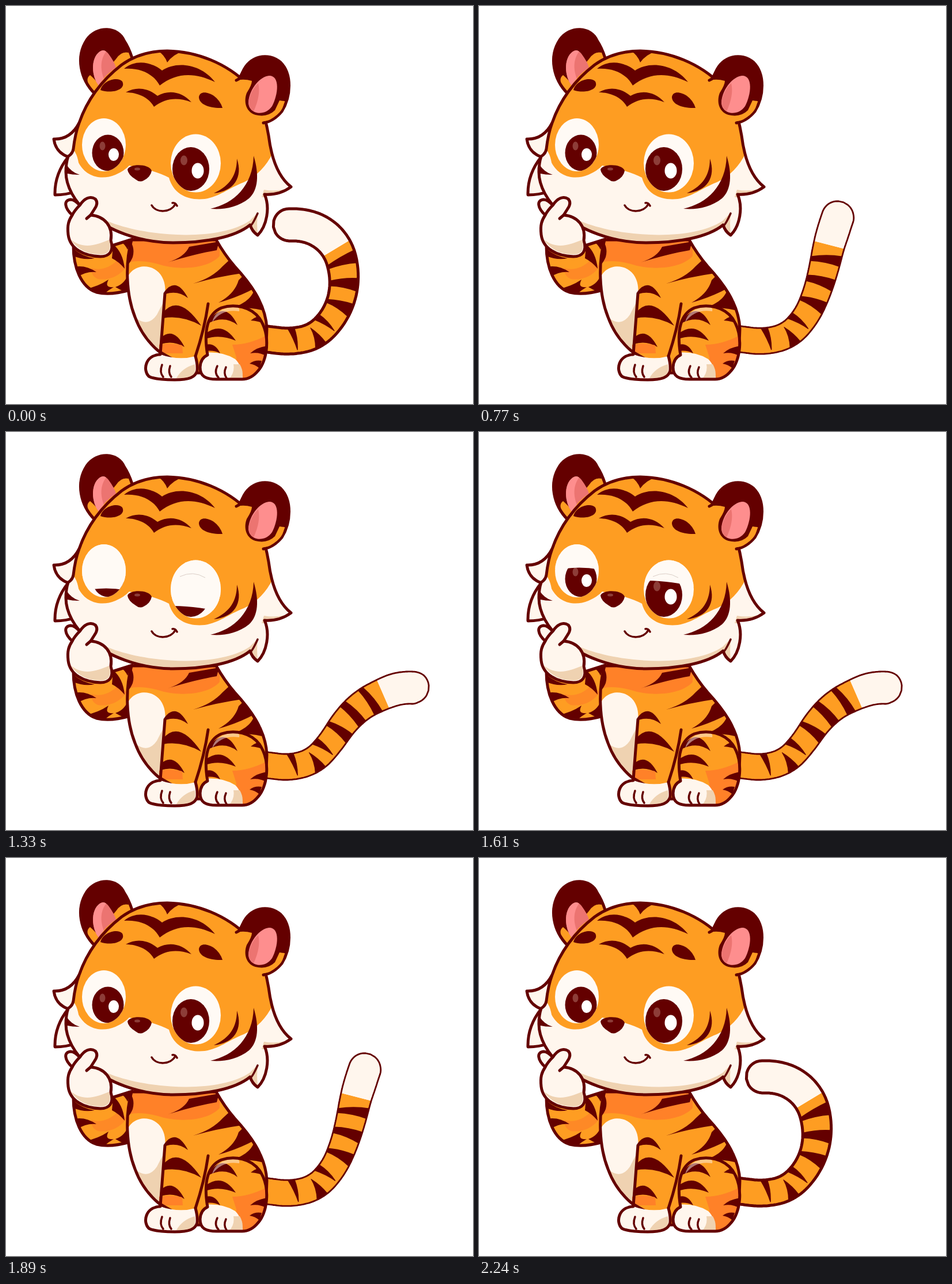
An HTML page for the animation above (2.73 s loop, 811 by 691 pixels).

```html
<!DOCTYPE html>
<html lang="en">
<head>
<meta charset="utf-8">
<title>Tiger</title>
<style>
  html, body { margin: 0; width: 100%; height: 100%; overflow: hidden; background: #fff; }
  svg { display: block; width: 100%; height: 100%; }
  .line { stroke: #640000; stroke-width: 5; stroke-linejoin: round; stroke-linecap: round; }
  .thin { stroke-width: 3.5; }
  .dark { fill: #640000; }
  .orange { fill: #fe9d22; }
  .deep { fill: #ff8128; }
  .cream { fill: #fff6ed; }
  .sclera { fill: #fffaf5; }
  .tan { fill: #efd2b1; }
  .pink { fill: #fe8e8e; }
  .rose { fill: #ec7471; }
  .glint { fill: #8d3d38; }
  .none { fill: none; }
</style>
</head>
<body>
<svg viewBox="0 0 811 691">
  <defs>
    <clipPath id="headClip"><path id="headShape" d="M127 203C140 165 165 130 201 102C225 85 252 78 280 78C332 79 382 99 420 136C440 157 450 190 456 225C461 265 473 297 495 314C480 325 464 328 449 327C459 350 453 382 437 398Q427 391 424 380C397 402 345 411 290 411C232 411 176 389 143 360C119 340 104 313 104 288Q104 273 108 261Q116 256 117 248Q120 222 127 203Z"/></clipPath>
    <clipPath id="eyeL"><ellipse cx="170" cy="241" rx="38" ry="46"/></clipPath>
    <clipPath id="eyeR"><ellipse cx="329.500" cy="273" rx="43.500" ry="50.500"/></clipPath>
    <clipPath id="bodyClip"><path id="bodyShape" d="M218 406C207 445 208 500 224 540Q237 576 266 600L330 637L425 637C444 620 453 593 453 560C451 515 421 478 397 452Q379 431 365 406Z"/></clipPath>
    <clipPath id="armClip"><path id="armShape" d="M117 417C117 453 130 488 157 497Q181 503 215 493L219 405L181 417Z"/></clipPath>
    <clipPath id="hindClip"><path id="hindShape" d="M350 606C343 564 349 535 374 524C398 516 426 523 440 542C461 572 453 617 438 633Q426 648 410 648H370C345 649 337 642 337 627Q338 611 350 606Z"/></clipPath>
  </defs>

  <!-- tail -->
  <g id="tail">
    <path id="fur" class="orange"/>
    <path id="tip" class="cream"/>
    <path id="bands" class="dark"/>
    <path id="edge" class="line none"/>
  </g>

  <!-- raised arm -->
  <use href="#armShape" class="orange"/>
  <g clip-path="url(#armClip)">
    <path class="deep" d="M148 455Q172 462 194 441L210 452Q190 478 160 474Q148 470 148 455Z" opacity=".7"/>
    <path class="dark" d="M114 418Q130 435 154 438Q136 442 117 434ZM118 453Q138 449 157 462Q140 460 123 471ZM139 491Q160 487 178 475Q170 490 187 488Q175 495 166 504ZM186 414Q203 427 206 456Q196 444 184 438ZM211 423Q207 414 199 409L218 404ZM190 488Q207 482 212 465V500Z"/>
  </g>
  <use href="#armShape" class="line none"/>

  <!-- body -->
  <use href="#bodyShape" class="orange"/>
  <g clip-path="url(#bodyClip)">
    <path class="deep" d="M210 400H371V434C352 456 300 460 264 448Q234 440 212 445Z"/>
    <path class="cream" d="M210 475C216 452 244 446 261 459C275 469 278 487 276 503L268 605C235 580 213 530 210 475Z"/>
    <path class="tan" d="M226 542Q247 558 262 536Q268 524 273 515L267 602Q239 580 226 542Z"/>
    <path class="dark" d="M217 410Q224 422 220 436Q216 446 209 452ZM281 445Q310 436 318 418L370 409L366 424Q330 430 281 445ZM325 482Q358 472 376 452L389 440L410 464Q367 470 325 482ZM369 515Q397 500 404 476L412 468L432 490Q402 506 369 515ZM390 524Q420 517 430 496L447 516L444 528Q422 523 390 524Z"/>
    <path class="dark" d="M275 496Q296 469 316 507Q298 493 277 500ZM272 533Q300 498 339 555Q305 536 273 542ZM269 576Q291 556 310 592Q290 580 269 587Z"/>
    <path class="deep" d="M266 588Q285 584 306 589L307 603H266Z"/>
  </g>
  <use href="#bodyShape" class="line none"/>

  <!-- hind leg -->
  <use href="#hindShape" class="orange"/>
  <g clip-path="url(#hindClip)">
    <path class="deep" d="M393 588Q425 588 460 568V655H400V610Z"/>
    <path class="cream" d="M330 604Q372 596 398 613Q412 626 411 655H330Z"/>
    <path class="tan" d="M385 650Q398 638 395 622L406 622Q414 636 409 650Z"/>
    <path class="dark" d="M355 543Q382 512 402 554Q380 537 353 550ZM346 569Q376 546 399 581Q371 569 346 578ZM344 589Q362 582 372 603Q358 596 344 600ZM456 536Q437 536 425 546Q441 547 456 555ZM456 590Q436 592 424 603Q440 600 452 608ZM444 616Q432 614 423 621Q432 622 440 629Z"/>
    <path class="cream" opacity=".5" d="M358 549Q363 525 399 521Q407 524 405 530Q375 525 358 549Z"/>
  </g>
  <use href="#hindShape" class="line none"/>
  <path class="line thin none" d="M367 625Q361 637 369 645M382 627Q377 638 383 646"/>

  <!-- front leg -->
  <path class="line none" d="M276 499L268 604M351 517Q345 560 329 608"/>
  <path id="paw" class="cream" d="M268 605C242 606 237 632 248 643Q258 649 293 649C318 649 329 645 332 633Q333 622 329 608Q300 616 268 605Z"/>
  <path class="tan" d="M296 646Q306 628 328 622Q332 645 314 646Z"/>
  <path class="line none" d="M268 605C242 606 237 632 248 643Q258 649 293 649C318 649 329 645 332 633Q333 622 329 608"/>
  <path class="line thin none" d="M271 623Q266 636 273 644M285 625Q281 637 287 644"/>

  <!-- left ear -->
  <path class="orange line" d="M154 152C129 127 121 88 140 59C158 33 195 36 205 60Q213 72 219 90L187 133Z"/>
  <path class="dark" d="M144 137C125 108 126 74 143 55C163 33 196 38 207 64L213 81Q200 78 191 92L158 132Q151 124 146 120Q138 126 144 137Z"/>
  <path class="rose" d="M161 138C149 123 146 91 163 79Q171 74 178 83Q189 98 191 107Q172 119 161 138Z"/>
  <path class="pink" d="M161 138C149 123 146 91 163 79Q169 75 174 79C162 94 165 114 170 126Q165 131 161 138Z"/>

  <!-- cheek tufts and head -->
  <path class="cream line" d="M127 203Q112 232 83 231Q86 254 108 262Q84 292 85 328Q105 328 121 322L145 240Z"/>
  <use href="#headShape" class="cream"/>
  <g clip-path="url(#headClip)">
    <path class="tan" d="M150 360C208 399 362 414 423 373L438 358Q434 375 438 402L425 387L410 415H190ZM448 319Q475 324 498 313L462 332H444Z"/>
    <path class="orange" d="M110 245Q122 249 126 272C139 297 166 303 190 293Q206 286 214 277L249 285Q270 291 283 298C291 327 316 338 345 335C371 331 385 317 413 306Q449 289 466 249L455 70H100Z"/>
    <path class="dark" d="M262 77Q275 84 280 98Q290 84 307 79L280 72Z"/>
    <path class="dark" d="M205 109C226 91 254 98 271 112C295 96 337 99 363 132C328 115 296 115 267 138C254 115 230 107 205 109ZM208 150C228 138 249 144 263 156C284 144 307 150 322 167C297 158 277 160 257 175C248 159 229 150 208 150Z"/>
    <path class="dark" d="M401 265C412 297 396 322 361 325C382 315 401 300 401 265ZM430 260C440 292 438 320 422 334C402 350 377 354 355 352C396 343 429 312 430 260Z"/>
    <path class="dark" d="M102 270Q111 288 128 293Q114 293 102 290Z"/>
  </g>
  <use href="#headShape" class="line none"/>
  <path class="line thin none" d="M437 360Q428 380 424 382"/>

  <!-- right ear -->
  <path class="orange" d="M397 128Q407 127 410 115C421 87 455 78 478 99C497 119 495 158 478 184Q464 200 447 203L424 178L415 150Z"/>
  <path class="dark" d="M402 129C410 107 424 88 447 86C476 85 494 111 492 144L489 166L475 164L467 181Q454 194 433 189C415 183 413 164 418 151Q427 137 427 130Q413 126 402 129Z"/>
  <path class="line none" d="M400 129Q408 126 411 115C422 87 455 79 477 98C497 118 495 157 479 183Q465 200 447 203"/>
  <path class="orange" d="M466 184Q478 175 482 164Q485 182 459 197Q448 202 445 198Q457 195 466 184Z"/>
  <path class="pink" d="M421 166C423 143 442 122 457 121C476 121 473 153 462 174C449 193 420 188 421 166Z"/>
  <path class="rose" d="M421 166Q425 146 438 134Q443 154 430 183Q422 179 421 166Z"/>

  <!-- face -->
  <path class="dark" d="M164 146C168 129 194 122 202 131C209 145 185 153 164 146ZM335 158C337 146 352 150 361 156Q372 164 376 177C354 178 335 171 335 158Z"/>
  <g clip-path="url(#eyeL)">
    <rect class="sclera" x="130" y="190" width="80" height="105"/>
    <ellipse class="dark" cx="177" cy="255" rx="27.500" ry="31.500"/>
    <ellipse class="glint" cx="167.500" cy="243" rx="5" ry="7.500"/>
    <ellipse cx="187" cy="258" rx="9" ry="11" fill="#fff"/>
    <path id="lidL" class="sclera" d="M130 135H210V239Q180 233 150 237L130 238Z"/>
  </g>
  <g clip-path="url(#eyeR)">
    <rect class="sclera" x="280" y="220" width="100" height="110"/>
    <ellipse class="dark" cx="321" cy="283" rx="32" ry="38"/>
    <ellipse class="glint" cx="309" cy="268" rx="6" ry="8.500"/>
    <ellipse cx="333" cy="286" rx="10.500" ry="13.500" fill="#fff"/>
    <path id="lidR" class="sclera" d="M280 150H380V271Q345 259 290 258L280 259Z"/>
    <path id="crease" class="none" d="M302 251Q325 240 346 253" stroke="#d9cdc6"/>
  </g>
  <path class="dark" d="M211 284C215 273 249 274 253 286Q251 297 239 303Q232 307 225 301Q212 293 211 284Z"/>
  <ellipse class="glint" cx="228" cy="283" rx="5" ry="2.500"/>
  <path class="line thin none" d="M253 346C261 360 286 359 294 344M289 342Q294 341 297 347"/>

  <!-- hand -->
  <path class="cream line" d="M115 363C101 350 100 337 112 336Q119 336 128 346C136 334 146 329 155 335Q161 342 154 352L147 363C172 365 186 383 182 407C188 426 179 435 164 435C134 434 111 421 108 397C106 380 109 372 115 363Z"/>
  <path class="tan" d="M112 405C135 424 158 414 179 406Q185 427 170 431Q132 434 112 405Z"/>
  <path class="line none" d="M128 346Q119 355 115 363M147 363L140 369"/>
</svg>

<script>
const LOOP = 2730, STEP = 70, START = 490, END = 2240;
const SAMPLES = 180, FUR = 120;
const $ = id => document.getElementById(id);
const mix = (a, b, t) => a + (b - a) * t;

// Headings along the tail in degrees, then fur length and tip length.
const poses = {
  rest: [-7, 12, 45, 66, 87, 106, 136, 165, 188, 258, 124],
  curl: [-7, 12, 45, 65, 85, 104, 126, 154, 184, 258, 125],
  up:   [-7, 14, 48, 66, 74, 78, 73, 72, 68, 264, 78],
  out:  [-7, 16, 48, 57, 45, 27, 20, 4, -12, 255, 81]
};
const blend = (a, b, t) => a.map((v, i) => mix(v, b[i], t));

// Each band: place along the fur (0 to 1), thickness and side at both ends.
const bands = [
  [.885, 9, -1, .91, 19, 1],
  [.75, 12, -1, .75, 20, 1],
  [.6, 8, -1, .6, 21, 1],
  [.44, 17, -1, .45, 1, .75],
  [.34, 1, -.65, .34, 17, 1],
  [.18, 16, -1, .21, 1, .75]
];

function spine(pose) {
  const [fur, tip] = pose.slice(9);
  let x = 450, y = 578;
  const points = [];
  for (let i = 0; i <= SAMPLES; i++) {
    const u = i / SAMPLES;
    const k = Math.min(8, Math.max(0, u * 9 - .5)), n = Math.min(7, Math.floor(k));
    const a = mix(pose[n], pose[n + 1], k - n) * Math.PI / 180;
    const e = Math.min(1, Math.max(0, (u - .3) / .5));
    let half = 22.5 + 5.5 * e * e * (3 - 2 * e);
    const left = (SAMPLES - i) * tip / (SAMPLES - FUR);
    if (left < 28) half *= Math.sqrt(1 - (1 - left / 28) ** 2);
    points.push({ x, y, nx: Math.sin(a) * half, ny: Math.cos(a) * half });
    const len = i < FUR ? fur / FUR : tip / (SAMPLES - FUR);
    x += Math.cos(a) * len;
    y -= Math.sin(a) * len;
  }
  return points;
}

const at = (p, side) => `${(p.x + p.nx * side).toFixed(1)} ${(p.y + p.ny * side).toFixed(1)}`;
const outline = pts => "M" + [...pts.map(p => at(p, 1)), ...pts.slice().reverse().map(p => at(p, -1))].join("L") + "Z";

function band(pts, fur, [uA, wA, vA, uB, wB, vB]) {
  const spot = (u, offset, v) => {
    const i = (u + offset / fur) * FUR, n = Math.floor(i), p = {};
    for (const key in pts[n]) p[key] = mix(pts[n][key], pts[n + 1][key], i - n);
    return at(p, v);
  };
  const u = (uA + uB) / 2, v = (vA + vB) / 2, w = (wA + wB) / 4;
  return `M${spot(uA, -wA / 2, vA)}Q${spot(u, 4 - w, v)} ${spot(uB, -wB / 2, vB)}` +
    `L${spot(uB, wB / 2, vB)}Q${spot(u, 4 + w, v)} ${spot(uA, wA / 2, vA)}Z`;
}

function drawTail(pose, stroke) {
  const pts = spine(pose);
  $("fur").setAttribute("d", outline(pts.slice(0, FUR + 1)));
  $("tip").setAttribute("d", outline(pts.slice(FUR)));
  $("bands").setAttribute("d", bands.map(b => band(pts, pose[9], b)).join(""));
  $("edge").setAttribute("d", outline(pts));
  $("edge").style.strokeWidth = stroke;
}

function drawEyes(k) {
  const shut = k >= 8, drop = (k - 8) / 4;
  for (const [id, travel] of [["lidL", 36], ["lidR", 44]]) {
    $(id).style.display = shut ? "" : "none";
    $(id).setAttribute("transform", `translate(0 ${shut ? drop * travel : 0})`);
  }
  $("crease").style.display = shut ? "" : "none";
}

function poseAt(k) {
  const t = 1 - Math.cos(Math.PI * Math.min(k, 8) / 8);
  return t < 1 ? blend(poses.curl, poses.up, t) : blend(poses.up, poses.out, t - 1);
}

let shown;
function frame() {
  const t = performance.now() % LOOP;
  const n = Math.floor((t - START) / STEP);
  const k = t < START || t >= END ? -1 : Math.min(n, 24 - n);
  if (k !== shown) {
    drawTail(k < 0 ? poses.rest : poseAt(k), k < 0 ? 5 : 2.8);
    drawEyes(k);
    shown = k;
  }
  requestAnimationFrame(frame);
}
frame();
</script>
</body>
</html>
```
